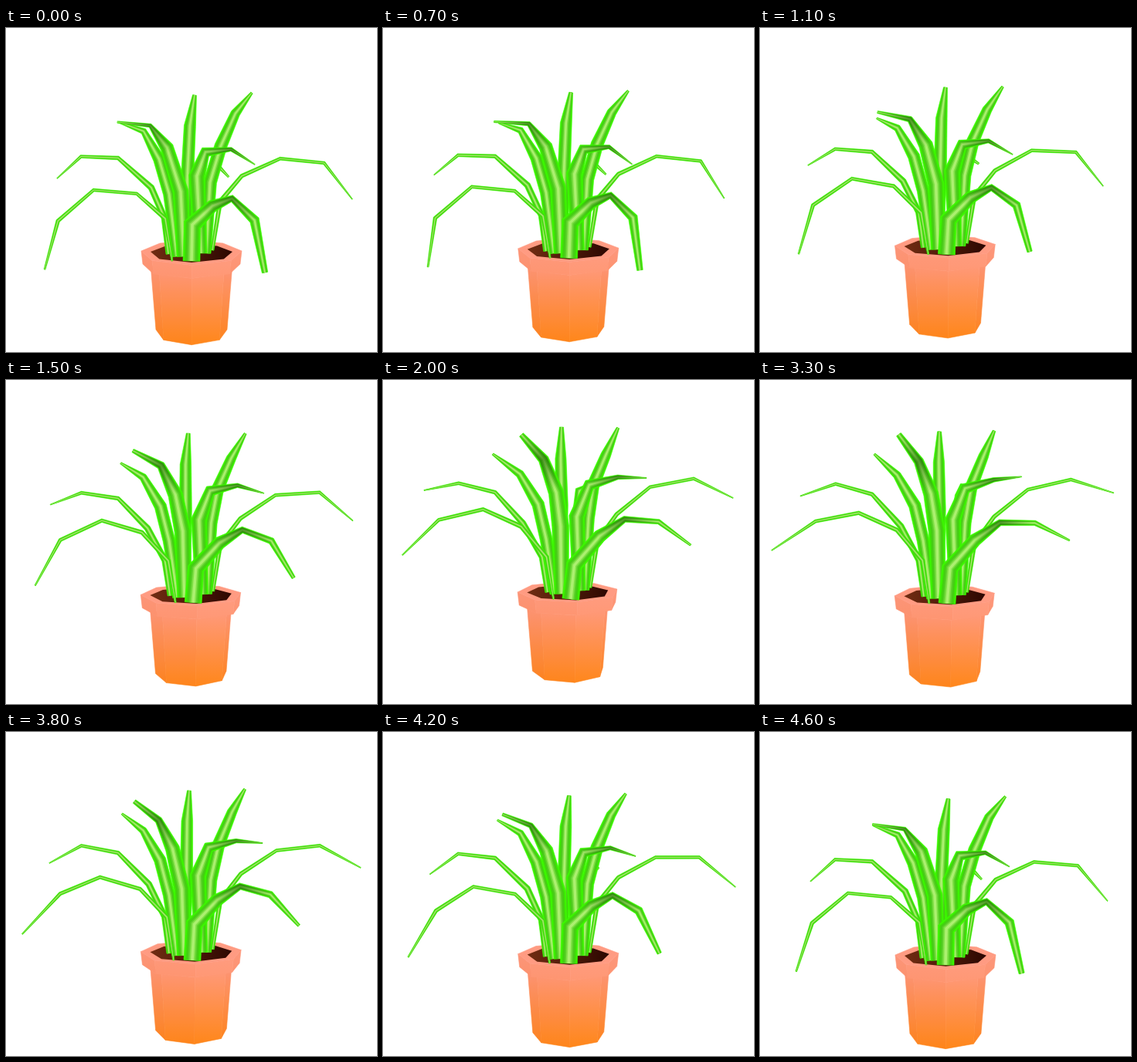
Recreate the animation shown at these times as an HTML page with a canvas. Size 480 px wide and 420 px high, loop 4.7 s.

```html
<!DOCTYPE html>
<html>
<head>
<meta charset="utf-8">
<title>Swaying plant</title>
<style>
html, body { margin: 0; width: 100%; height: 100%; overflow: hidden; background: #fff; }
canvas { display: block; }
</style>
</head>
<body>
<canvas id="stage" width="480" height="420"></canvas>
<script>
const ctx = document.getElementById('stage').getContext('2d');
const LOOP = 4700, STEP = 100, TURN = 2 * Math.PI;
const TIP_TIMES = [0, 1100, 2000, 2800, 3800];
// Colours from the rim of a blade to its shiny middle
const SHADES = [[60, 248, 0], [62, 220, 8], [70, 203, 22], [92, 208, 42], [130, 225, 72], [172, 240, 112]];

const mix = (a, b, k) => a + (b - a) * k;
const sway = (t, lag = 0) => (1 - Math.cos(TURN * (t - lag) / LOOP)) / 2;

// Trigonometric interpolation through the tip positions
function tipWeights(t) {
  const half = d => Math.sin(Math.PI * d / LOOP);
  return TIP_TIMES.map(a => TIP_TIMES.reduce(
    (w, b) => a === b ? w : w * half(t - b) / half(a - b), 1));
}

// joints: x, y, width when low, then x, y, width when high
// tip: x, y at each of TIP_TIMES; ends: tip width low and high
const leaf = (joints, tip, ends, dark) => ({ joints, tip, ends, dark });

const leaves = [
  leaf([[256, 285, 10, 256, 265, 10], [262, 205, 12, 248, 190, 12], [274, 178, 9, 252, 140, 12]],
    [288, 193, 283, 176, 268, 136, 260, 123, 270, 158], [2, 5]),
  leaf([[232, 285, 14, 230, 266, 14], [235, 185, 16, 231, 160, 16], [238, 127, 15, 229, 99, 14]],
    [244, 87, 240, 77, 231, 61, 229, 60, 237, 76], [5, 5]),
  leaf([[267, 288, 4, 268, 268, 4], [277, 225, 6, 277, 208, 6], [305, 192, 5, 302, 172, 5],
    [355, 170, 4, 344, 134, 4], [412, 177, 4, 400, 118, 4]],
    [448, 222, 444, 205, 453, 153, 455, 132, 459, 176], [1, 1]),
  leaf([[259, 292, 12, 261, 271, 12], [264, 200, 17, 266, 178, 15], [278, 153, 16, 271, 135, 16],
    [297, 111, 12, 287, 95, 13]],
    [318, 84, 314, 76, 304, 62, 300, 60, 309, 74], [3, 4]),
  leaf([[210, 293, 6, 213, 274, 6], [205, 246, 8, 206, 228, 8], [188, 207, 8, 180, 183, 8],
    [145, 169, 5, 145, 142, 5], [97, 168, 4, 98, 127, 4]],
    [66, 195, 62, 178, 53, 143, 51, 137, 56, 170], [1, 1]),
  leaf([[221, 296, 12, 222, 276, 12], [211, 215, 15, 211, 205, 16], [198, 170, 15, 201, 160, 16],
    [178, 134, 8, 177, 120, 11]],
    [146, 122, 151, 117, 142, 96, 142, 90, 150, 106], [2, 3]),
  leaf([[230, 296, 18, 231, 276, 18], [226, 212, 20, 230, 188, 22], [208, 155, 17, 226, 145, 20],
    [186, 127, 5, 211, 99, 15]],
    [144, 122, 152, 109, 179, 71, 187, 60, 166, 90], [2, 8], 3),
  leaf([[252, 292, 16, 254, 272, 16], [247, 192, 21, 251, 176, 20], [258, 161, 14, 268, 133, 15],
    [291, 158, 5, 306, 121, 6]],
    [322, 177, 327, 164, 341, 127, 343, 116, 332, 144], [1, 1], 3),
  leaf([[215, 302, 2, 221, 283, 2], [206, 247, 6, 212, 228, 6], [169, 215, 4, 180, 187, 6],
    [113, 211, 4, 132, 161, 5], [67, 253, 5, 73, 167, 4]],
    [50, 313, 50, 293, 25, 227, 16, 198, 21, 262], [2, 1]),
  leaf([[240, 302, 22, 243, 283, 22], [241, 255, 23, 248, 239, 21], [267, 231, 16, 282, 199, 17],
    [292, 222, 9, 316, 174, 8], [320, 252, 13, 364, 170, 5]],
    [335, 317, 349, 290, 398, 214, 411, 186, 379, 251], [8, 1], 3)
];

function trace(points) {
  ctx.beginPath();
  points.forEach(([x, y]) => ctx.lineTo(x, y));
  ctx.closePath();
}

function fill(points, style, seam) {
  trace(points);
  ctx.fillStyle = ctx.strokeStyle = style;
  ctx.fill();
  if (seam) { ctx.lineWidth = 0.6; ctx.stroke(); }
}

function gradient(x0, y0, x1, y1, from, to) {
  const g = ctx.createLinearGradient(x0, y0, x1, y1);
  g.addColorStop(0, from);
  g.addColorStop(1, to);
  return g;
}

function pose({ joints, tip, ends }, t, weights) {
  const spine = joints.map(([x0, y0, w0, x1, y1, w1], i) => {
    const k = sway(t, 70 * i);
    return [mix(x0, x1, k), mix(y0, y1, k), mix(w0, w1, k)];
  });
  const at = axis => weights.reduce((sum, w, i) => sum + w * tip[2 * i + axis], 0);
  spine.push([at(0), at(1), mix(ends[0], ends[1], sway(t, 400))]);
  return spine;
}

function unit(a, b) {
  const dx = b[0] - a[0], dy = b[1] - a[1], d = Math.hypot(dx, dy) || 1;
  return [dx / d, dy / d];
}

function outline(spine, scale) {
  const left = [], right = [];
  spine.forEach((p, i) => {
    const into = unit(spine[Math.max(i - 1, 0)], p);
    const out = unit(p, spine[Math.min(i + 1, spine.length - 1)]);
    const [nx, ny] = unit([0, 0], [into[0] + out[0], into[1] + out[1]]);
    const r = p[2] / 2 * scale;
    left.push([p[0] - ny * r, p[1] + nx * r]);
    right.unshift([p[0] + ny * r, p[1] - nx * r]);
  });
  return left.concat(right);
}

function drawLeaf(blade, t, weights) {
  const spine = pose(blade, t, weights);
  SHADES.forEach((rgb, i) => fill(outline(spine, 1 - i / SHADES.length), `rgb(${rgb})`, i === 0));
  if (!blade.dark) return;
  const [x, y] = spine[blade.dark];
  const shadow = ctx.createRadialGradient(x, y, 0, x, y, 42);
  shadow.addColorStop(0, 'rgba(25,95,0,.6)');
  shadow.addColorStop(1, 'rgba(25,95,0,0)');
  fill(outline(spine, 0.8), shadow);
}

function drawPot(t) {
  const k = sway(t), yaw = -0.17 * sway(t, 150);
  const ring = (r, y, depth) => Array.from({ length: 8 }, (_, i) => {
    const a = i * Math.PI / 4 + yaw, near = 1 + 0.16 * Math.sin(a);
    return [240 + r * Math.cos(a) * near, y - 17 * k + depth * Math.sin(a) * near];
  });
  const wall = (top, bottom, from, to, y0, y1) => {
    for (let i = 0; i < 4; i++) {
      const quad = [top[i], top[i + 1], bottom[i + 1], bottom[i]];
      fill(quad, gradient(0, y0 - 17 * k, 0, y1 - 17 * k, from, to), true);
      fill(quad, `rgba(225,90,40,${[0.07, 0, 0.04, 0.1][i]})`);
    }
  };
  const depth = 16 - 3 * k, lip = ring(65, 289, depth);
  wall(ring(53, 306, depth), ring(46, 391, 17 - 2 * k), '#ff9876', '#ff871c', 318, 408);
  wall(lip, ring(63, 306, depth), '#ff9c82', '#ff9874', 289, 325);
  fill(lip, '#ff9b82', true);
  fill(ring(53, 290, 12 - 2 * k), gradient(188, 0, 296, 0, '#702c12', '#2a0600'));
}

function draw() {
  const t = Math.floor(performance.now() / STEP) * STEP % LOOP;
  const weights = tipWeights(t);
  ctx.fillStyle = '#fff';
  ctx.fillRect(0, 0, 480, 420);
  drawPot(t);
  leaves.forEach(blade => drawLeaf(blade, t, weights));
  requestAnimationFrame(draw);
}
draw();
</script>
</body>
</html>
```
